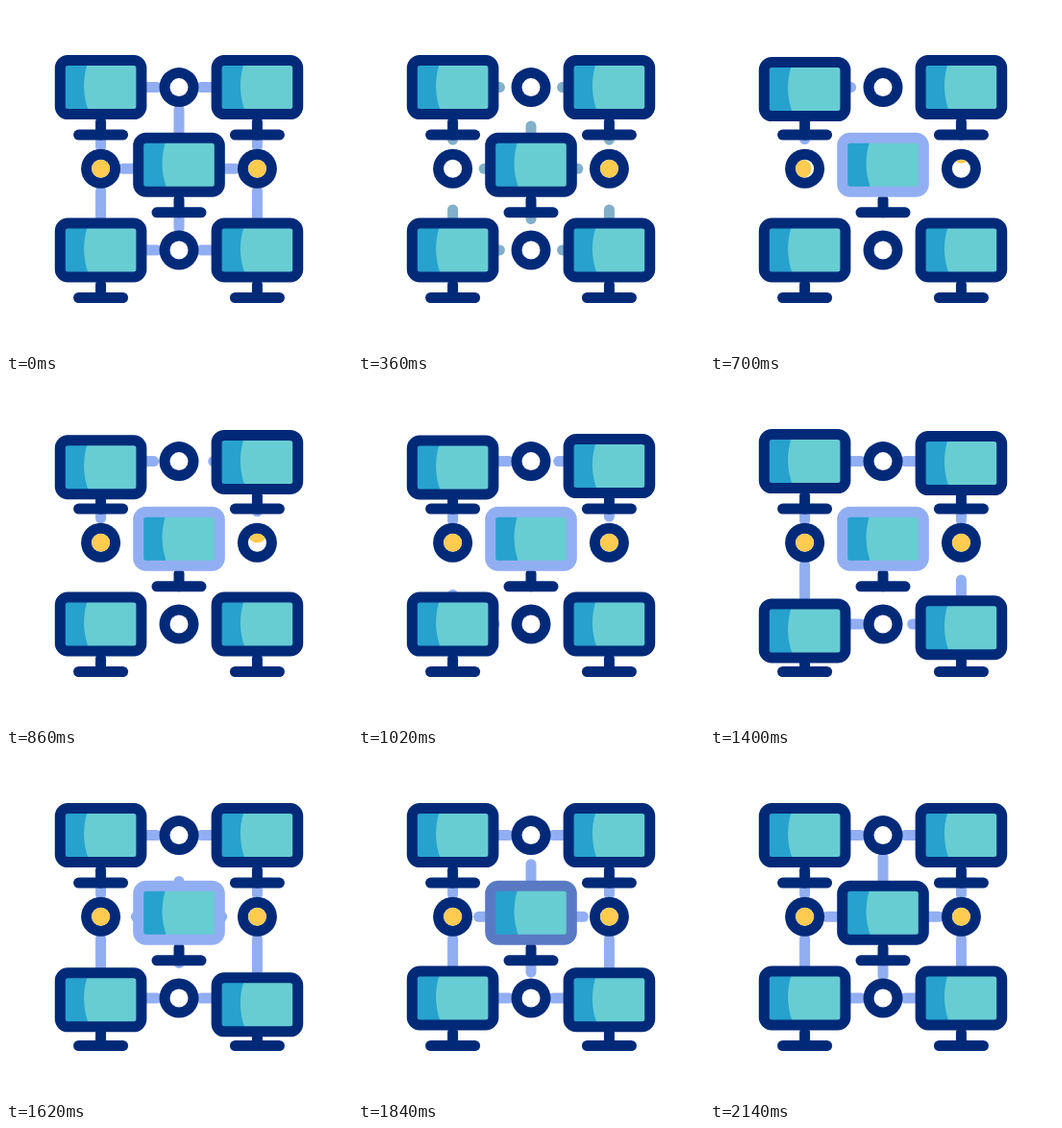
These frames come from a looping animation (360 by 360 pixels, 2.4 s). An HTML page with a canvas:

```html
<!DOCTYPE html>
<html lang="en">
<head>
<meta charset="utf-8">
<title>Computer network</title>
<style>
html, body { margin: 0; width: 100%; height: 100%; overflow: hidden; background: #fff; }
canvas { display: block; }
</style>
</head>
<body>
<canvas id="stage" width="360" height="360"></canvas>
<script>
const ctx = document.getElementById('stage').getContext('2d');
const LOOP = 2400, STROKE = 11, HUB = 20.5, HOLE = 9.5;
const NAVY = [0, 42, 120], LINK = [146, 174, 242], DIM = [130, 175, 201];
const YELLOW = '#ffcb50', TEAL = '#67cdd2', BLUE = '#27a1ce';

const ramp = (t, start, span) => Math.min(1, Math.max(0, (t - start) / span));
const mix = (a, b, k) => `rgb(${a.map((v, i) => Math.round(v + (b[i] - v) * k))})`;
const rgb = color => mix(color, color, 0);

// Everything sits on a 3 x 3 grid: monitors on the corners and centre, hubs between
const monitors = [], hubs = [];
for (let row = -1; row <= 1; row++) {
  for (let col = -1; col <= 1; col++) {
    const node = { row, col, x: 180 + col * 81.4, y: 169.3 + row * 84.7 };
    ((row + col) % 2 ? hubs : monitors).push(node);
  }
}
const centre = monitors.splice(2, 1)[0];
monitors.forEach((m, i) => m.start = 565 + 213 * i);
monitors.push(centre);
centre.y -= 4;
centre.start = 1560;

function line(x1, y1, x2, y2, color) {
  ctx.strokeStyle = color;
  ctx.beginPath();
  ctx.moveTo(x1, y1);
  ctx.lineTo(x2, y2);
  ctx.stroke();
}

function circle(x, y, r) {
  ctx.beginPath();
  ctx.arc(x, y, r, 0, 7);
}

function disc(x, y, r, color) {
  ctx.fillStyle = color;
  circle(x, y, r);
  ctx.fill();
}

// Links shrink back into their monitor, then grow out to the neighbouring hubs
function drawLinks(m, t) {
  const growing = t >= m.start;
  const p = growing ? ramp(t, m.start, 370) : 1 - ramp(t, 40, 420) ** 2;
  if (p <= 0) return;
  const color = growing ? rgb(LINK) : mix(LINK, DIM, Math.min(1, (1 - p) * 1.8));
  for (const hub of hubs) {
    const dx = hub.col - m.col, dy = hub.row - m.row;
    if (Math.abs(dx) + Math.abs(dy) !== 1) continue;
    const edge = dx ? 47.5 : dy < 0 ? 33.5 : 55;
    const distance = dx ? Math.abs(hub.x - m.x) : Math.abs(hub.y - m.y);
    const from = distance - edge + STROKE / 2;
    const to = distance - edge - p * (distance - edge - HUB + 3) + STROKE / 2;
    line(hub.x - dx * from, hub.y - dy * from, hub.x - dx * to, hub.y - dy * to, color);
  }
}

function drawMonitor(m, t) {
  const dip = m === centre ? 0 : 7 * Math.sin(Math.PI * ramp(t, m.start, 760)) ** 2;
  const pale = m === centre ? ramp(t, 420, 220) - ramp(t, 1700, 360) : 0;
  ctx.save();
  ctx.translate(m.x, m.y);
  line(0, 36, 0, 49.5, rgb(NAVY));
  line(-23, 49.5, 23, 49.5, rgb(NAVY));
  ctx.translate(0, dip);
  ctx.fillStyle = TEAL;
  ctx.fillRect(-38, -24, 76, 48);
  ctx.fillStyle = BLUE;
  ctx.fill(new Path2D('M-38-24H-14Q-21.5 0-13 24H-38Z'));
  ctx.strokeStyle = mix(NAVY, LINK, pale);
  ctx.beginPath();
  ctx.roundRect(-42.3, -28, 84.6, 56, 8);
  ctx.stroke();
  ctx.restore();
}

// Side hubs drain and refill, the left one sideways and the right one upwards
function drawHub(hub, t) {
  disc(hub.x, hub.y, HUB, rgb(NAVY));
  disc(hub.x, hub.y, HOLE, '#fff');
  if (!hub.col) return;
  const right = hub.col > 0;
  const drained = ramp(t, right ? 510 : 100, 240) - ramp(t, right ? 790 : 580, 140);
  const shift = -2 * HOLE * drained;
  ctx.save();
  circle(hub.x, hub.y, HOLE);
  ctx.clip();
  disc(hub.x + (right ? 0 : shift), hub.y + (right ? shift : 0), HOLE, YELLOW);
  ctx.restore();
}

function draw(t) {
  ctx.fillStyle = '#fff';
  ctx.fillRect(0, 0, 360, 360);
  ctx.lineWidth = STROKE;
  ctx.lineCap = 'round';
  monitors.forEach(m => drawLinks(m, t));
  monitors.forEach(m => drawMonitor(m, t));
  hubs.forEach(hub => drawHub(hub, t));
}

const begin = performance.now();
function tick() {
  draw((performance.now() - begin) % LOOP);
  requestAnimationFrame(tick);
}
tick();
</script>
</body>
</html>
```
